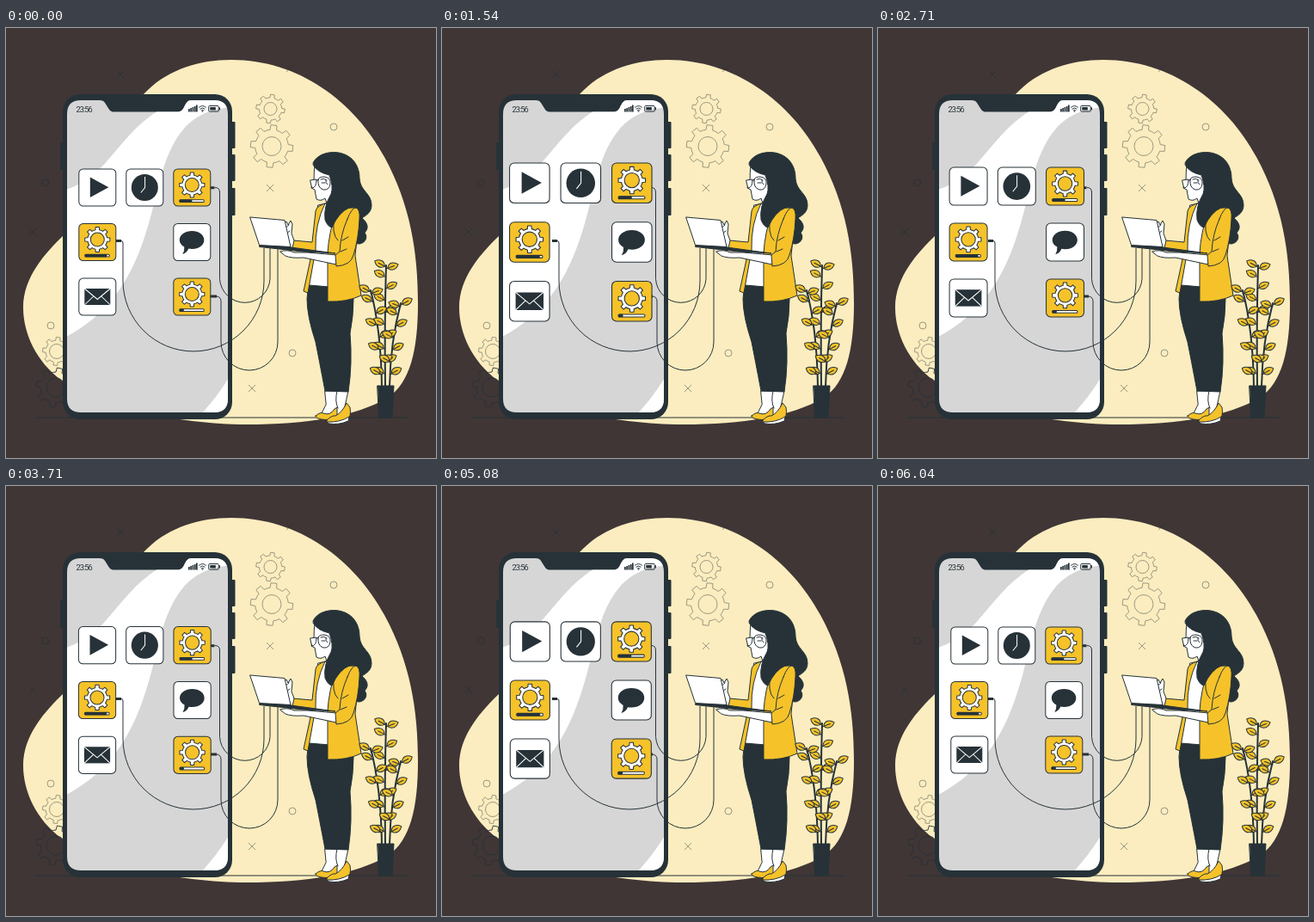
An HTML page that plays this animation: 500 by 500 pixels, repeating every 6.08 s.

```html
<!DOCTYPE html>
<html lang="en">
<head>
<meta charset="utf-8">
<title>App updates</title>
<style>
  html, body { margin: 0; width: 100%; height: 100%; overflow: hidden; background: #403636; }
  svg { display: block; width: 100vw; height: 100vh; }
  .dark { fill: #263238; }
  .white { fill: #fff; }
  .gold { fill: #f5c229; }
  .line { fill: none; stroke: #263238; stroke-width: 1; }
  .edge { stroke: #263238; stroke-width: 1; stroke-linejoin: round; stroke-linecap: round; }
  .faint { fill: none; stroke: #263238; stroke-width: .9; }
  .faint > * { opacity: .5; }
  .faint > .deep { opacity: 1; }
  .clock { font: 9.2px Roboto, "Liberation Sans", sans-serif; letter-spacing: -.95px; }
  /* A registered number keeps the scaled outlines sharp. */
  @property --s { syntax: "<number>"; inherits: false; initial-value: 1; }
  #icons { transform-origin: 161.3px 249px; transform: scale(var(--s)); animation: pulse 6080ms infinite; }
  @keyframes pulse {
    0%   { --s: 1; animation-timing-function: linear; }
    20%  { --s: 1.1; animation-timing-function: cubic-bezier(.12, .15, .65, 1); }
    60%  { --s: 1; animation-timing-function: linear; }
    80%  { --s: 1.1; animation-timing-function: ease-out; }
    100% { --s: 1; }
  }
</style>
</head>
<body>
<svg viewBox="0 0 500 500">
  <defs>
    <clipPath id="screen"><path d="M87 84H109C114 84 115 87 117 90C120 95 121 97.500 126 97.500H199C204 97.500 206 95 208 90C210 87 211 84 216 84H242Q258 84 258 100V431Q258 447 242 447H87Q71 447 71 431V100Q71 84 87 84Z"/></clipPath>
    <rect id="tile" class="edge" x="-21.500" y="-21.500" width="43" height="43" rx="5"/>
  </defs>

  <path fill="#fbedbf" d="M262 37C340 37 405 85 440 150C470 205 479 260 479 320C479 375 470 412 444 430C405 452 350 461 280 461C200 461 110 440 65 410C35 388 20 355 20 325C20 290 45 262 68 240C105 200 115 120 165 72C190 48 225 37 262 37Z"/>

  <g id="decor" class="faint">
    <circle cx="381" cy="115" r="4"/>
    <circle class="deep" cx="45.500" cy="180" r="4"/>
    <circle cx="333" cy="378" r="4"/>
    <circle cx="52" cy="346" r="4"/>
  </g>
  <path class="line" d="M33 453H468"/>

  <!-- phone -->
  <g class="dark">
    <rect x="63" y="133" width="5" height="32" rx="1"/>
    <rect x="260" y="109" width="6.500" height="31" rx="1"/>
    <rect x="260" y="147" width="6.500" height="31" rx="1"/>
    <rect x="260" y="186" width="6.500" height="32" rx="1"/>
    <rect x="66" y="77" width="197" height="378" rx="20"/>
  </g>
  <g clip-path="url(#screen)">
    <path fill="#d6d6d6" d="M66 80H263V455H66Z"/>
    <path class="white" d="M66 189C123 173 125 125 187 90L200 80H263V92C222 95 200 114 184 160C166 215 160 315 66 361Z"/>
    <path class="white" d="M263 400C252 419 241 434 226 450H263Z"/>
  </g>
  <text class="dark clock" x="81.500" y="97.700">23:56</text>
  <path class="dark" d="M212 94h1.700v3.500h-1.700zM214.300 93h1.700v4.500h-1.700zM216.600 92h1.700v5.500h-1.700zM218.900 91h1.700v6.500h-1.700zM221 89.500h1.700v8h-1.700z"/>
  <path class="line" d="M224.300 92.500Q228.500 88.700 232.700 92.500M225.600 94.300Q228.500 91.700 231.400 94.300M227 96Q228.500 94.700 230 96"/>
  <circle class="dark" cx="228.500" cy="97" r=".8"/>
  <rect class="line" x="235.700" y="90.500" width="11.500" height="6.600" rx="1"/>
  <path class="dark" d="M237.300 92h6.500v3.600h-6.500zM247.700 92.300h1.300v3h-1.300z"/>

  <!-- cables -->
  <g class="line">
    <path d="M134 247.500Q136 247.500 136 250V294A82 82 0 0 0 300 294V256"/>
    <path d="M243 185.500Q248.500 185.500 248.500 191V291.700A29.300 29.300 0 0 0 307 291.700V256"/>
    <path d="M244 312Q250 312 250 318V365A33 33 0 0 0 316 365V256"/>
    <path style="stroke-width:3" d="M128 247.500H134M237 185.700H242.500M237 312H245"/>
  </g>

  <g id="icons">
    <g transform="translate(106.300 185.500)">
      <use href="#tile" class="white"/><path class="dark" d="M-8.500-12V11.500L13-.3Z"/>
    </g>
    <g transform="translate(161.300 185.500)">
      <use href="#tile" class="white"/><circle class="dark" r="15.500"/>
      <path fill="none" stroke="#fff" d="M.3-12.500V0L-4.500 6"/>
    </g>
    <g transform="translate(216.300 249)">
      <use href="#tile" class="white"/>
      <path class="dark" d="M0-13C8-13 14-8.500 14-2.500S8 8 0 8Q-2 8-4 7.600Q-6 12.500-11 14Q-8.500 10-9 5.500C-12.500 3.500-14.500 1-14.500-2.500C-14.500-8.500-8-13 0-13Z"/>
    </g>
    <g transform="translate(106.300 312.500)">
      <use href="#tile" class="white"/><path class="dark" d="M-15-9.500H15V9.500H-15Z"/>
      <path fill="none" stroke="#fff" d="M-15-9.500L0 3L15-9.500M-15 9.500L-4.500-.5M15 9.500L4.500-.5"/>
    </g>
  </g>

  <!-- woman -->
  <g class="edge">
    <path class="dark" d="M357 157C361 148 373 143 387 145C403 148 411 160 411 175C412 190 425 192 425 206C425 215 418 218 414 221C421 227 422 233 417 238C421 243 418 250 411 251C403 251 398 245 394 236L385 215L380 165Z"/>
    <path class="white" d="M371 422H398L394 440L397 448L375 456L366 450L372 438Z"/>
    <path fill="none" d="M385 422Q382 434 386 442"/>
    <path class="gold" d="M360 451Q366 446 369 448Q377 451 382 443L385 441V451Q377 457 367 455Q360 454 360 451Z"/>
    <path class="gold" d="M373 456Q379 450 383 451Q391 447 396 436L400 441Q402 452 396 457Q386 461 376 460Q372 459 373 456Z"/>
    <path class="white" d="M373 458Q388 459 399 452L398 457Q386 462 376 460Z"/>
    <path class="dark" d="M352 299H376V315L404 315Q404 335 400 355Q403 390 398 423L371 422Q364 385 360 365Q350 335 350 315Z"/>
    <path class="white" d="M363 206L378 203L385 225L376 301L352 299L357 250Z"/>
    <path class="gold" d="M371 204Q361 207 360 213L356 249L334 247L332 257L356 260L346 306L351 308L360 258Q359 228 371 204Z"/>
    <path class="gold" d="M384 212Q396 208 407 209Q411 212 410 226L406 265L413 311Q396 319 374 318L374 262Q375 240 384 212Z"/>
    <path class="white" d="M322 228L326 225L328 229L331 224L333 228L332 239L335 247L333 256L325 251L321 240Z"/>
    <path fill="none" d="M326 239L330 236M323 234L329 229"/>
    <path class="white" d="M359 158Q358 170 358 178L355 186L359 188L361 199Q366 202 371 198L374 207L384 211L386 165Z"/>
    <path class="dark" d="M357 159Q362 168 376 171Q381 185 378 193Q369 208 371 223Q374 231 379 232Q387 214 399 209L407 207L396 160L370 149Z"/>
    <path class="white" d="M363 176Q364 173 370 173Q378 174 377 181Q376 189 369 188Q362 186 363 176ZM354 177L361 176Q361 186 356 186Z"/>
    <path fill="none" d="M361 177L363 177M366 176Q370 174 373 177M367 180H371M374 182Q371 180 372 177"/>
    <path class="white" d="M284 220L324 223.500L331 254.500L295 252.500Z"/>
    <path class="dark" d="M295 253L331 255L383 262L345 260L295 254.500Z"/>
    <path class="white" d="M319 260Q327 257 335 261L350 261L385 264L384 275L346 267Q331 268 325 265Z"/>
    <path class="gold" d="M397 222Q402 209 407 209Q412 211 411 222Q410 245 404 264Q401 276 384 277L383 264L388 260Q389 240 397 222Z"/>
    <path fill="none" d="M382 217Q378 240 386 247M391 247L398 243M389 260L396 257"/>
  </g>

  <!-- plant -->
  <g id="plant" class="edge">
    <path class="line" style="stroke-width:2" d="M441 417Q440 340 442 276M437 417Q436 350 424 305M446 417Q447 365 459 320"/>
    <path class="dark" d="M432 416H451L449 453H434Z"/>
  </g>
</svg>
<script>
  const $ = id => document.getElementById(id);
  const add = (parent, markup) => parent.insertAdjacentHTML("beforeend", markup);

  // Eight-toothed gear around the origin, with arcs between the teeth.
  function gear(r, turn = 0) {
    const root = r * .78;
    const at = (a, rad) => `${(rad * Math.cos(a)).toFixed(2)} ${(rad * Math.sin(a)).toFixed(2)}`;
    let d = "";
    for (let i = 0; i < 8; i++) {
      const t = i * Math.PI / 4 + turn;
      d += `${i ? `A${root} ${root} 0 0 1 ` : "M"}${at(t - .2, root)}L${at(t - .14, r)}L${at(t + .14, r)}L${at(t + .2, root)}`;
    }
    return d + `A${root} ${root} 0 0 1 ${at(turn - .2, root)}Z`;
  }

  for (const [x, y, r, hole, turn, tone] of [
    [307.5, 94, 16.8, 7.5, .15, ""], [309, 137.5, 24.8, 11, .1, ""],
    [59, 376, 16.5, 8.5, .1, ""], [58, 418, 23, 11, .2, "deep"]
  ]) add($("decor"), `<g class="${tone}" transform="translate(${x} ${y})"><path d="${gear(r, turn)}"/><circle r="${hole}"/></g>`);

  for (const [x, y, tone] of [[133, 54, "deep"], [330, 47, ""], [307, 186, ""], [286, 419, ""], [31, 237, "deep"]])
    add($("decor"), `<path class="${tone}" d="M${x - 4} ${y - 4}l8 8m0-8l-8 8"/>`);

  for (const [x, y, done] of [[216.3, 185.5, 14.5], [106.3, 249, 25.5], [216.3, 312.5, 5]])
    add($("icons"), `<g transform="translate(${x} ${y})">
      <use href="#tile" class="gold"/>
      <g transform="translate(0 -3)"><path class="white edge" d="${gear(14.7)}"/><circle class="gold edge" r="8"/></g>
      <rect class="white edge" x="-14.500" y="14.200" width="28.500" height="2.800" rx="1"/>
      <rect class="dark" x="-14.500" y="14" width="${done}" height="3.200" rx="1"/></g>`);

  const leaf = (x, y, side, tilt = -28) => add($("plant"),
    `<g transform="translate(${x.toFixed(1)} ${y.toFixed(1)}) scale(${side} 1) rotate(${tilt})"><path class="gold" d="M2 0C5-6 11-5 15 0C11 5 5 5 2 0Z"/><path d="M0 0H10"/></g>`);

  // Leaves alternate up each stem: foot, bend and tip of its curve.
  for (const [foot, bend, tip, top, first] of [[441, 440, 442, 276, -1], [437, 436, 424, 305, -1], [446, 447, 459, 320, 1]]) {
    const mid = top + (417 - top) * .48, count = Math.round((417 - top) / 14);
    for (let i = 1; i < count; i++) {
      const t = i / count, u = 1 - t, mix = (a, b, c) => u * u * a + 2 * u * t * b + t * t * c;
      leaf(mix(foot, bend, tip), mix(417, mid, top), i % 2 ? first : -first);
    }
    leaf(tip, top + 2, first);
    leaf(tip, top + 4, -first, -20);
  }
</script>
</body>
</html>
```
